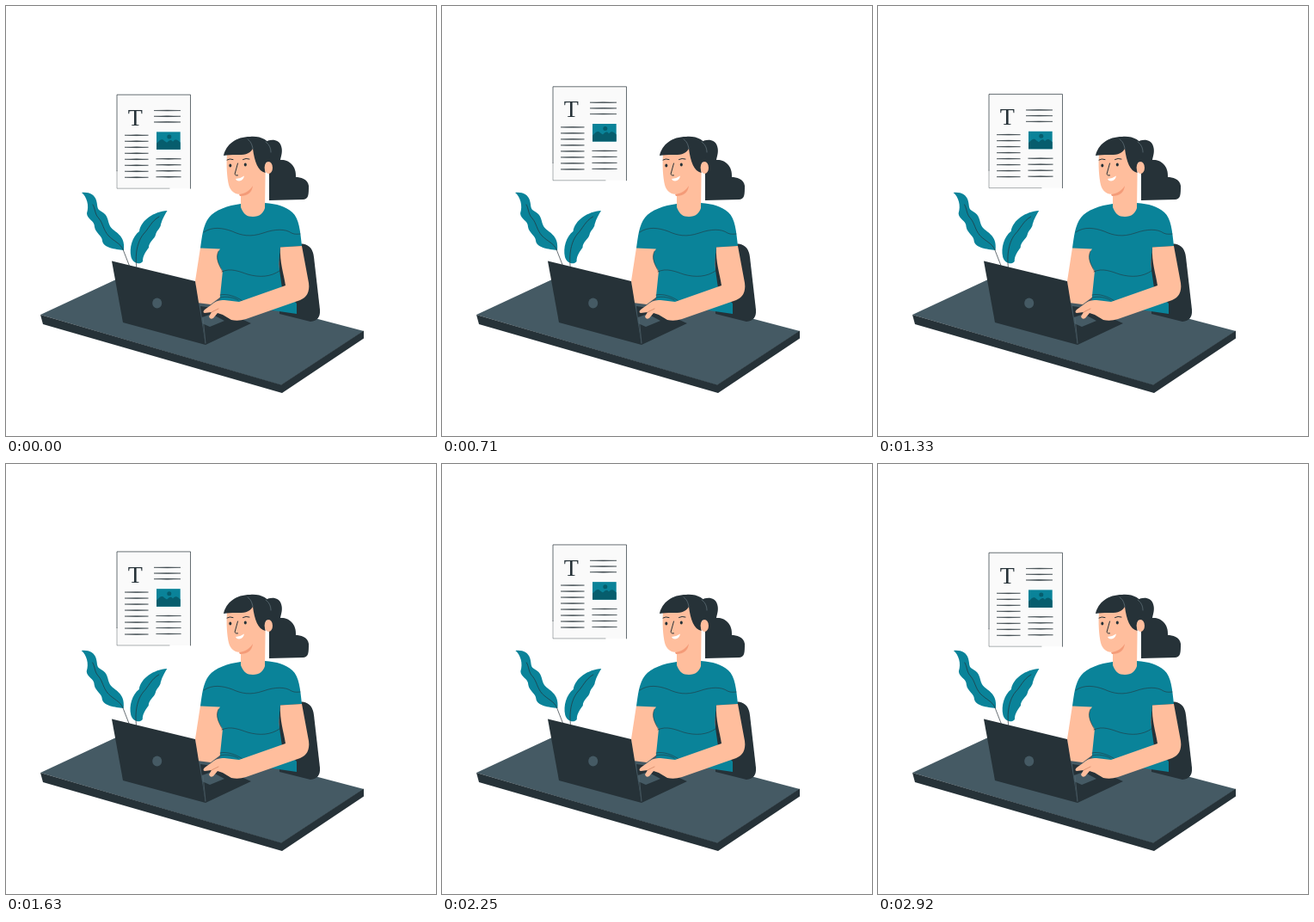
An HTML page for the animation above (2960 ms loop, 500 by 500 pixels).

```html
<!DOCTYPE html>
<html lang="en">
<head>
<meta charset="utf-8">
<title>Working at a desk</title>
<style>
  html, body { margin: 0; width: 100%; height: 100%; overflow: hidden; background: #fff; }
  svg { display: block; width: 100vw; height: 100vh; }
  .dark { fill: #263238; }
  .slate { fill: #455a64; }
  .teal { fill: #0a8399; }
  .skin { fill: #ffbe9d; }
  .line { fill: none; stroke: #263238; stroke-width: .7; stroke-linecap: round; stroke-linejoin: round; }
</style>
</head>
<body>
<svg viewBox="0 0 500 500">
  <g id="page">
    <rect x="129" y="103.4" width="85.5" height="109" fill="#fafafa"/>
    <path class="line" d="M129 192V103.4H214.5V212.4"/>
    <path class="line" opacity=".55" d="M129 192V212.4H190"/>
    <text class="dark" x="150.4" y="139" font-size="28" text-anchor="middle" font-family="'Liberation Serif', serif">T</text>
    <path id="copy" class="dark" stroke="#263238" stroke-width=".5"/>
    <rect class="teal" x="175" y="146.6" width="27.7" height="20.5"/>
    <path fill="#065d6d" d="M175 160C179 156 181 154 184 157L187 159C190 156 192 155 194 158C197 154 200 156 202.7 159V167.1H175Z"/>
    <circle cx="189.8" cy="152.2" r="2.5" fill="#065d6d"/>
  </g>

  <g id="leftLeaf">
    <path class="teal" d="M88 217C96 216 103 219 105 226C107 233 105 236 111 239C119 243 118 250 121 256C126 264 139 265 137 284C127 283 113 281 112 273C112 267 104 264 103 257C103 249 94 248 94 241C97 232 94 222 88 217Z"/>
    <path class="line" d="M101 231C104 236 103 242 108 247C113 253 113 260 119 267C126 274 133 276 136 283L145 306"/>
  </g>
  <g id="rightLeaf">
    <path class="teal" d="M187.5 238C172 239 157 249 155 262C147 268 143 281 145.500 292C148 300 156 301 159 297C159 290 163 285 166 281C166 274 173 271 174 266C175 261 180 258 180 254C182 247 185 242 187.500 238Z"/>
    <path class="line" d="M178 245C169 250 166 259 160 265C155 271 149 284 152 306"/>
  </g>

  <path class="slate" d="M40 359L128 318L150 308L416 378L320 441Z"/>
  <path class="dark" d="M40 359L320 440.500L416 377.500V386.500L321 450L43 370Z"/>
  <path class="dark" d="M317 279L345 276.500C354 278 357 284 358 292L365 353Q366 366 354 367L318 358Z"/>

  <path class="dark" d="M302 158C308 154 318 155 320 163C322 169 320 174 319 179C328 178 338 185 337 199C342 199 351 201 352 209C352 219 352 224 346 225L306 226V190L300 170Z"/>
  <path class="skin" d="M226 281L220 320L222 345L238 347L250 338L253 310L249 281Z"/>
  <path class="teal" d="M273 230C258 232 243 237 236 246C229 255 228 268 226 281.500L249 282.500C243 290 245 298 252 308L249 337V345L338 358V346L321 328L317 300L319 280.500L344 279C342 262 341 247 333 240C325 233 315 230 301 229Z"/>
  <path class="line" opacity=".8" d="M230 263C240 256 252 258 263 262C274 267 284 269 299 264C313 259 325 259 332 264C336 266 340 265 342 265M251 309C261 304 272 309 281 312C295 316 308 315 318 308M247 285C243 293 248 302 252 309M249 336C257 334 268 338 275 343M249 339C257 337 265 339 270 342"/>

  <path class="skin" d="M257 170C256 186 257 199 259 208C261 216 267 219 273 219V234C276 242 280 245 287 245C295 245 299 241 301 235L302 165L285 158Z"/>
  <path fill="#f49b78" d="M271 219C279 218 284 214 287 209C286 217 281 221 272 221Z"/>
  <path class="dark" d="M253 174C256 161 267 152 284 152C296 151 306 156 307 164C308 171 307 177 305 181C301 181 301 187 301.500 194C293 192 289 181 287 166C283 173 276 173 268 173C262 173 258 173 253 174Z"/>
  <path class="line" style="stroke:#667780" d="M287 166C286 160 284 157 281 155M302 158C306 161 308 165 308 170"/>
  <ellipse class="skin" cx="305.300" cy="188" rx="4.700" ry="7"/>
  <ellipse class="dark" cx="260.800" cy="185.500" rx="1.500" ry="2"/>
  <ellipse class="dark" cx="278.300" cy="184.500" rx="1.500" ry="2"/>
  <path class="line" style="stroke-width:1" d="M257 179Q260 177 264 178.500M275.500 178.500Q279 176.500 283 178M269.500 183L266 195.500Q267 197.500 269.500 197"/>
  <path fill="#fff" d="M267 201Q272 201 277 197.500Q276 203 271 203.500Q268 203.500 267 201Z"/>

  <path class="dark" d="M226 349L247 352L285 369L232 394Z"/>
  <path class="slate" d="M228 362L239 358L254 366L237 373L228 369Z"/>
  <path class="dark" d="M123 296.500L220 320L232 394L136 368Z"/>
  <path class="line" style="stroke:#54666f" d="M229 362L232 392"/>
  <ellipse class="slate" cx="175.700" cy="345.500" rx="5.500" ry="6"/>
  <path class="skin" d="M319 280.500L344 279L352 322Q354 337 342 342L279 364Q270 367 262 365L252 359L246 357L241 363Q237 365 236 361L239 356L231 357Q228 356 231 353L238 348Q245 341 254 342L271 344L325 325C323 311 318 298 319 280.500Z"/>
  <path class="line" style="stroke:#cf805f" d="M239 356L247 352"/>
</svg>
<script>
  const LOOP = 1480;
  const el = id => document.getElementById(id);

  // Lines of copy, thin at both ends
  function rows(x1, x2, y, count, gap) {
    const mid = (x1 + x2) / 2;
    return Array.from({ length: count }, (_, i) => {
      const row = y + i * gap;
      return `M${x1} ${row}Q${mid} ${row - .8} ${x2} ${row}Q${mid} ${row + .8} ${x1} ${row}Z`;
    }).join('');
  }

  el('copy').setAttribute('d',
    rows(172, 203, 121.800, 3, 6.700) + rows(138, 165.500, 150.500, 8, 7) + rows(174.500, 203.500, 178, 4, 7));

  // Plant sway: [time, horizontal offset]
  const sway = [[0, 0], [150, -.3], [300, 2], [560, -3.2], [700, -3], [1080, -1], [LOOP, 0]];

  function swayAt(t) {
    const i = sway.findIndex(key => key[0] > t);
    const [t0, x0] = sway[i - 1], [t1, x1] = sway[i];
    return x0 + (x1 - x0) * (t - t0) / (t1 - t0);
  }

  const move = (id, x, y) => el(id).setAttribute('transform', `translate(${x} ${y})`);

  function draw(time) {
    const t = time % LOOP;
    move('page', 0, 4.700 * Math.cos(2 * Math.PI * (t + 25) / LOOP) - 4.900);
    const x = swayAt(t);
    move('leftLeaf', x, 0);
    move('rightLeaf', x * .85, 0);
  }

  const start = performance.now();
  function tick() {
    draw(performance.now() - start);
    requestAnimationFrame(tick);
  }
  tick();
</script>
</body>
</html>
```
